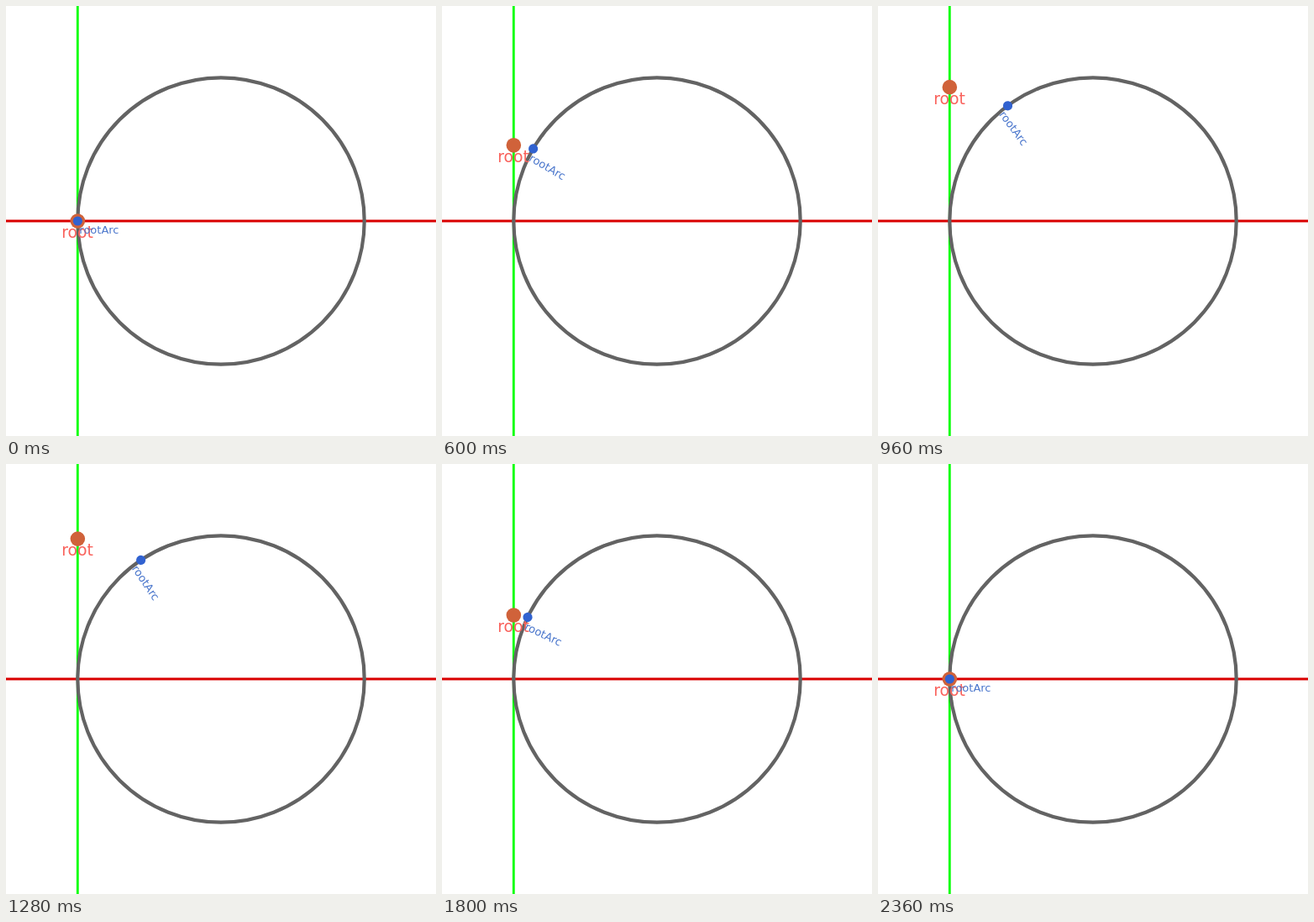
Write an HTML page that moves like this. It is 512 px wide and 512 px high and loops after 2400 ms.

```html
<!DOCTYPE html>
<html>
<head>
<meta charset="utf-8">
<style>
  html, body { margin: 0; height: 100%; overflow: hidden; background: #fff; }
  svg { display: block; width: 100vw; height: 100vh; }
  text { font-family: "DejaVu Sans", sans-serif; }
</style>
</head>
<body>
<svg viewBox="0 0 512 512">
  <path d="M0 256H512" stroke="#d90000" stroke-width="2.8"/>
  <path d="M85.3 0V512" stroke="#0f0" stroke-width="2.8"/>
  <circle cx="256" cy="256" r="170.7" fill="none" stroke="#636363" stroke-width="4.2"/>
  <g id="root">
    <circle r="8.8" fill="#d0623a"/>
    <text x="-.3" y="20.3" font-size="18.8" text-anchor="middle" fill="#f9625c">root</text>
  </g>
  <g id="arc">
    <circle r="5.6" fill="#3162d0"/>
    <text x="2" y="14.8" font-size="13" fill="#4a76cc">rootArc</text>
  </g>
</svg>
<script>
const FRAME = 40, FRAMES = 60, PEAK = 29, LAST = 59;
const RADIUS = 512 / 3, LEFT = 256 - RADIUS, HANDLE = 0.39;
const root = document.getElementById('root');
const arc = document.getElementById('arc');

// Symmetric Bezier ease: find the curve parameter for x by bisection.
function ease(x) {
  let lo = 0, hi = 1, s = 0.5;
  for (let i = 0; i < 24; i++) {
    s = (lo + hi) / 2;
    const r = 1 - s;
    const bx = 3 * s * r * (r * HANDLE + s * (1 - HANDLE)) + s ** 3;
    if (bx < x) lo = s; else hi = s;
  }
  return s * s * (3 - 2 * s);
}

function draw() {
  const frame = Math.floor(performance.now() / FRAME) % FRAMES;
  const angle = ease(frame < PEAK ? frame / PEAK : (LAST - frame) / (LAST - PEAK));
  root.setAttribute('transform', `translate(${LEFT} ${256 - RADIUS * angle})`);
  arc.setAttribute('transform',
    `rotate(${angle * 180 / Math.PI} 256 256) translate(${LEFT} 256)`);
  requestAnimationFrame(draw);
}
draw();
</script>
</body>
</html>
```
